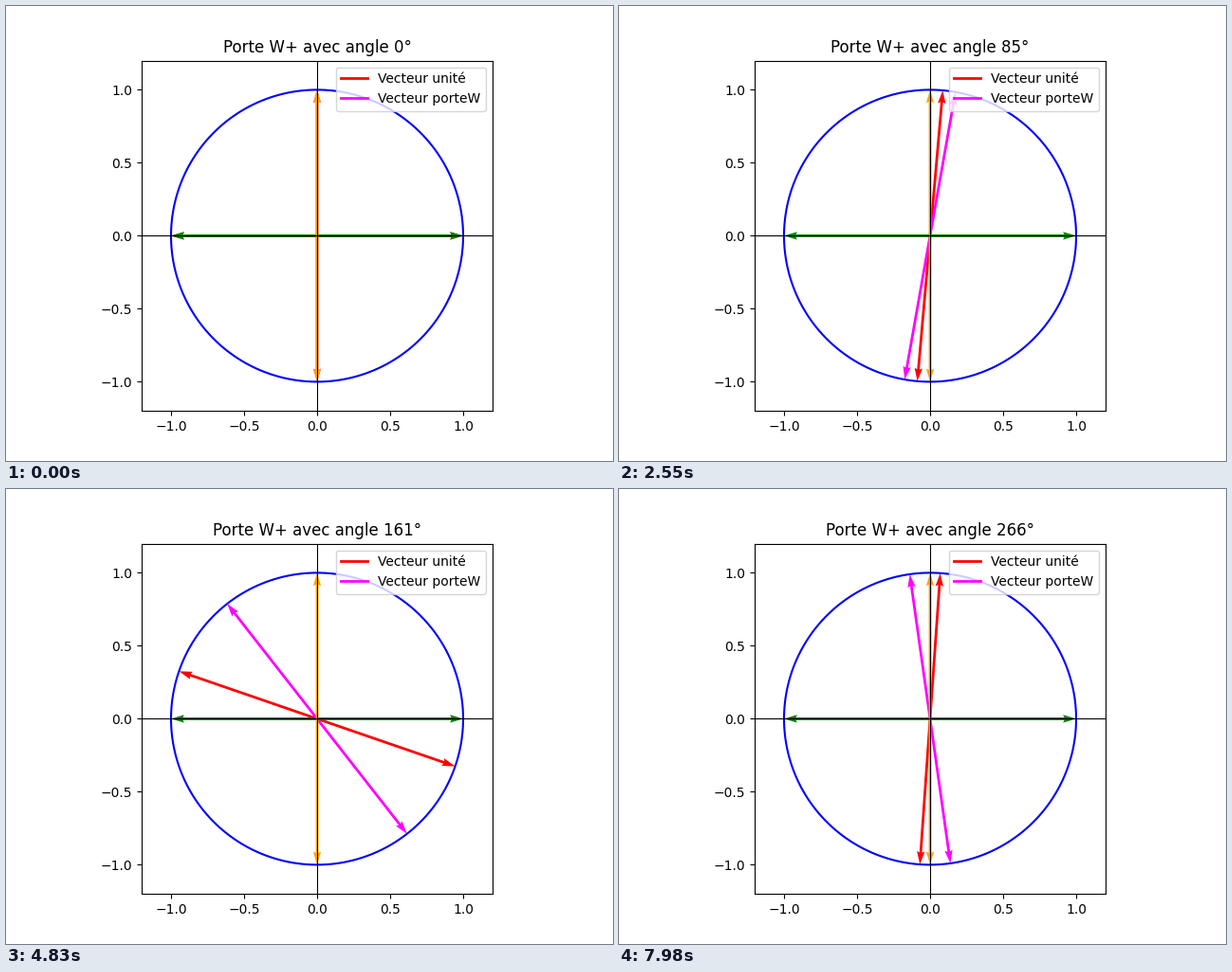
Animation, 640 px wide and 480 px high, one loop 8 s. Source, as a matplotlib script:

```python
import numpy as np
import matplotlib.pyplot as plt
from matplotlib.animation import FuncAnimation
from matplotlib.lines import Line2D

FRAMES = 267
INTERVAL = 30  # ms, one degree per frame

fig, ax = plt.subplots(figsize=(6.4, 4.8), dpi=100)
ax.set_aspect("equal")
ax.set_xlim(-1.2, 1.2)
ax.set_ylim(-1.2, 1.2)

t = np.linspace(0, 2 * np.pi, 200)
ax.plot(np.cos(t), np.sin(t), color="blue")
ax.axhline(0, color="black", lw=0.8)
ax.axvline(0, color="black", lw=0.8)


def double_arrow(x, y, color):
    return ax.quiver([0, 0], [0, 0], [x, -x], [y, -y], color=color,
                     angles="xy", scale_units="xy", scale=1)


unit = double_arrow(1, 0, "red")
gate = double_arrow(0, 1, "magenta")
double_arrow(1, 0, "green")
double_arrow(0, 1, "orange")

ax.legend(handles=[Line2D([], [], color="red", lw=2, label="Vecteur unité"),
                   Line2D([], [], color="magenta", lw=2, label="Vecteur porteW")],
          loc="upper right")
title = ax.set_title("")


def aim(arrow, x, y):
    arrow.set_UVC([x, -x], [y, -y])


def update(deg):
    a = np.radians(deg)
    c, s = np.cos(a), np.sin(a)
    aim(unit, c, s)
    # the gate doubles the angle and stays in the upper half plane
    aim(gate, 2 * c * abs(s), abs(c * c - s * s))
    title.set_text(f"Porte W+ avec angle {deg}°")
    return unit, gate, title


anim = FuncAnimation(fig, update, frames=FRAMES, interval=INTERVAL,
                     repeat=True, repeat_delay=0, blit=False)
plt.show()
```
